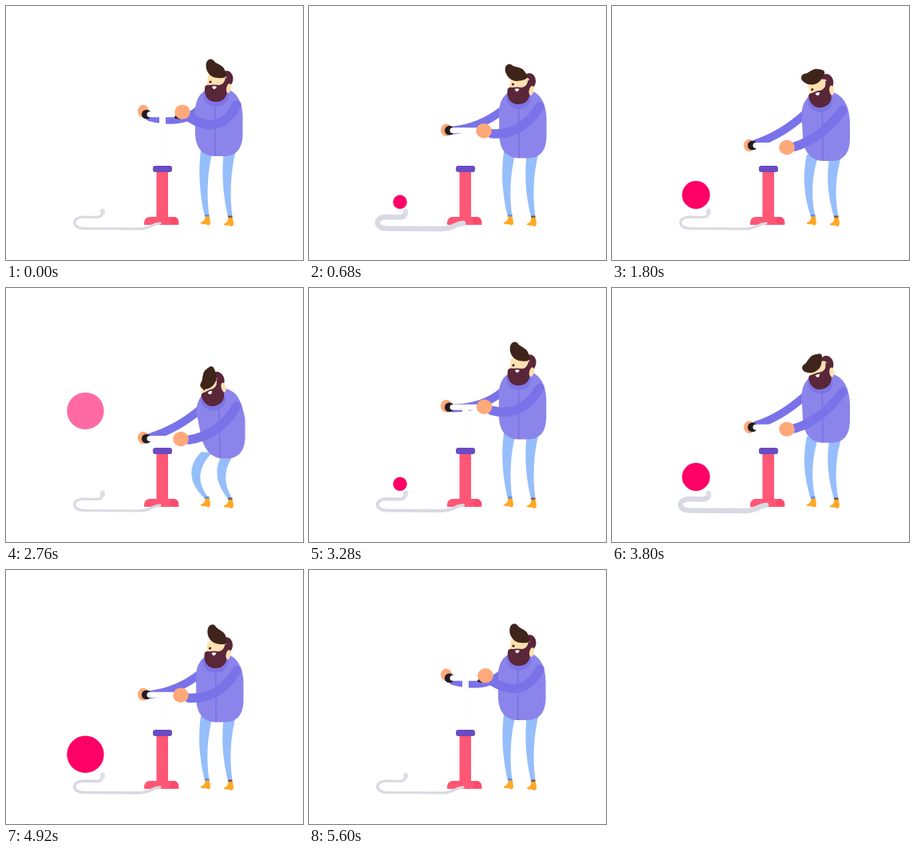
Write an HTML page with a canvas that moves like this. It is 372 by 318 pixels and loops after 5640 ms.

```html
<!DOCTYPE html>
<html lang="en">
<head>
<meta charset="utf-8">
<title>Pump</title>
<style>
html, body { margin: 0; width: 100%; height: 100%; overflow: hidden; background: #fff; }
canvas { display: block; width: 372px; height: 318px; }
</style>
</head>
<body>
<canvas id="stage"></canvas>
<script>
const W = 372, H = 318, LOOP = 5640, STROKES = 7;
const canvas = document.getElementById('stage');
const ratio = window.devicePixelRatio || 1;
canvas.width = W * ratio;
canvas.height = H * ratio;
const ctx = canvas.getContext('2d');

const SKIN = '#ffa97b', FACE = '#ffe0b0', BEARD = '#5a2639', HAIR = '#3f241b';
const COAT = '#8b85eb', SLEEVE = '#7a72e8', JEANS = '#96befb', SHOE = '#ffa826';
const RED = '#ff5775', PURPLE = '#6b4bc2', HOSE = '#d9d9e4', PINK = '#ff0066';

// Pose values at four depths of the stroke, from raised to pushed down.
const DEPTH = [0.05, 0.263, 0.519, 0.9];
const POSES = {
  bar: [136, 156.5, 175, 189],
  leftHand: [131.5, 155.5, 174.5, 187.5],
  handX: [221, 219, 219, 219],
  handY: [132.5, 156.5, 177, 189],
  farY: [139, 156, 172, 187],
  farCx: [222, 215, 212, 215],
  farCy: [150, 152, 162, 176],
  shoulder: [126, 128, 132, 150],
  nearY: [139, 160, 176, 190],
  nearCx: [268, 266, 262, 268],
  nearCy: [164, 163, 166, 184],
  left: [237, 238, 237.5, 238.5],
  right: [296.5, 297.5, 298, 299.5],
  top: [102, 104, 107, 126],
  bottom: [188, 190.5, 194, 213.5],
  lean: [0, 0.5, 2.5, 9],
  knee: [0, -0.5, -3, -19],
  headX: [263, 262.5, 261, 259.5],
  headY: [107, 110, 114, 134.5],
  tilt: [0, 0, -17, -24]
};
// The quiff trails the body a little.
const QUIFF_LAG = 25;
const QUIFF = {
  x: [273.5, 273.5, 262.5, 257.5],
  y: [88, 91, 83, 102.5],
  tilt: [0, 0, -74, -113]
};

const clamp = x => Math.max(0, Math.min(1, x));
const smooth = x => { x = clamp(x); return x * x * (3 - 2 * x); };
const easeOut = x => 1 - (1 - clamp(x)) ** 2;
const easeInOut = x => x < 0.5 ? 2 * x * x : 1 - 2 * (1 - x) ** 2;

// Smooth curve through the poses, mirrored at both ends of the stroke.
const [d0, d1, d2, d3] = DEPTH;
const KNOTS = [-d1, -d0, d0, d1, d2, d3, 2 - d3, 2 - d2];
const ORDER = [1, 0, 0, 1, 2, 3, 3, 2];

function sample(row, u) {
  let i = 1;
  while (i < 5 && u > KNOTS[i + 1]) i++;
  const v = k => row[ORDER[k]];
  const slope = k => (v(k + 1) - v(k - 1)) / (KNOTS[k + 1] - KNOTS[k - 1]);
  const h = KNOTS[i + 1] - KNOTS[i], s = (u - KNOTS[i]) / h;
  const a = smooth(s);
  return v(i) * (1 - a) + v(i + 1) * a
    + h * s * (1 - s) * ((1 - s) * slope(i) - s * slope(i + 1));
}

const strokesAt = t => (t + 20) / LOOP * STROKES;

function poseAt(rows, t) {
  const phase = (strokesAt(t) + 1) % 1;
  const u = phase < 0.5 ? phase * 2 : 2 - phase * 2;
  const pose = {};
  for (const key in rows) pose[key] = sample(rows[key], u);
  return pose;
}

function ellipse(x, y, rx, ry, color, turn = 0) {
  ctx.fillStyle = color;
  ctx.beginPath();
  ctx.ellipse(x, y, rx, ry, turn, 0, Math.PI * 2);
  ctx.fill();
}

function box(x, y, w, h, r, color) {
  ctx.fillStyle = color;
  ctx.beginPath();
  ctx.roundRect(x, y, w, h, r);
  ctx.fill();
}

function shape(d, color) {
  ctx.fillStyle = color;
  ctx.fill(new Path2D(d));
}

function line(d, color, width) {
  ctx.strokeStyle = color;
  ctx.lineWidth = width;
  ctx.stroke(new Path2D(d));
}

function placed(x, y, degrees, paint) {
  ctx.save();
  ctx.translate(x, y);
  ctx.rotate(degrees * Math.PI / 180);
  paint();
  ctx.restore();
}

function swellAt(s) {
  let most = 0;
  for (let n = 0; n < STROKES - 1; n++) {
    const p = s - n;
    most = Math.max(most, smooth((p - 0.47) / 0.2) * (1 - smooth((p - 0.88) / 0.32)));
  }
  return most;
}

function drawHose(s) {
  line('M193 272C180 273 183 279 165 279L97 278.5C82 278 82 264.5 97 264L114 264.5Q121 264 121 258',
    HOSE, 3.2 + 3.3 * swellAt(s));
  ellipse(121, 257.5, 3, 4, '#dedee7');
}

function drawBalloon(s, start) {
  const age = s - start;
  const flight = clamp((age - 3.152) * 1.83);
  let r = 0;
  [8.7, 8.8, 5.7].forEach((gain, i) => r += gain * easeOut((age - i - 0.46) / 0.26));
  if (r <= 0) return;
  ctx.globalAlpha = 1 - clamp((flight - 0.3) / 0.6);
  ellipse(122.7 - r, 254 - r - 130 * easeInOut(flight), r, r, PINK);
  ctx.globalAlpha = 1;
}

function drawPump() {
  box(173, 264, 43.5, 10, [7, 7, 1, 1], RED);
  ellipse(210.5, 269, 5, 4.7, '#f94a6b');
  box(188.5, 206, 14.5, 67, 0, RED);
  box(184, 200, 24, 8, 3, PURPLE);
}

function drawLegs(p) {
  const hip = p.bottom - 8, k = p.knee, mid = (hip + 262) / 2;
  for (const x of [0, 29]) {
    const drop = k * (x ? 0.7 : 1);
    shape(`M${244 + x} ${hip}Q${239 + x + drop * 1.1} ${mid} ${249 + x} 264L${254.5 + x} 264`
      + `Q${249 + x + drop} ${mid} ${259 + x} ${hip}Z`, JEANS);
    placed(x, x ? 1.5 : 0, 0, () => {
      shape('M249.5 263L254.5 263Q258 275 253 274.5L250 273Q244 274 243.5 271.5Q250 269 249.5 263Z', SHOE);
      box(249, 261, 5.5, 2.5, 0.5, x ? '#7d5a4a' : '#5f8fe6');
    });
  }
}

function drawCoat(p) {
  const { left: l, right: r, top: t, bottom: b, lean } = p;
  shape(`M${l} ${t + 30}C${l} ${t + 12} ${l + 9} ${t + 2} ${l + 24} ${t}L${r - 25} ${t}`
    + `C${r - 10} ${t + 3} ${r - lean / 2} ${t + 15} ${r} ${t + 38}L${r} ${b - 26}`
    + `Q${r - 1} ${b - 1} ${r - 22} ${b}L${l + 24 + lean} ${b}`
    + `Q${l + 2 + lean * 1.2} ${b - 1} ${l + lean * 0.7} ${b - 26}Z`, COAT);
  const x = (l + r) / 2 - 5;
  line(`M${x + lean / 4} ${t + 20}L${x + lean / 2} ${b - 1}`, '#776ee2', 1.4);
  ellipse(p.headX, p.headY + 5, 15.5, 14, '#7d75e6');
}

function drawHead(p, q) {
  placed(p.headX, p.headY, p.tilt, () => {
    ellipse(13.5, -16, 8, 10, BEARD);
    shape('M-11.5 -6L-10 -20Q2 -25 13 -19L15 -5Z', FACE);
    shape('M-14 -5Q-13 -9 -8 -8Q-2 -9 4 -8Q11 -9 12 -18L17 -12Q14 -6 14 0'
      + 'C13 10 6 13 0 13C-10 13 -15 6 -14 -5Z', BEARD);
    ellipse(16, -4, 2.9, 6, FACE, 0.2);
    shape('M-5 -6Q-2 -7.5 1 -6Q-0.5 -2.5 -2.5 -2.8Q-4 -3.3 -5 -6Z', '#fff');
    ellipse(-7, -12, 1.6, 1.5, HAIR);
  });
  placed(q.x, q.y, q.tilt, () => {
    shape('M2 -3C4 3 -4 3 -11 2C-18 1 -23 -6 -23 -13C-23 -20 -18 -23 -14 -20'
      + 'C-11 -16 -8 -16 -4 -13C0 -11 1 -6 2 -3Z', HAIR);
  });
}

function drawHandle(p) {
  const y = p.bar;
  line(`M180 ${p.farY}Q${p.farCx} ${p.farCy} 243 ${p.shoulder + 2}`, SLEEVE, 10);
  box(192, y, 8, Math.max(0, 200 - y), 0, '#fff');
  if (y < 190) line(`M198 ${y + 8}L198 199`, '#fbfbfd', 1);
  ellipse(172, p.leftHand, 7, 7.8, SKIN);
  box(170, y - 6.2, 12, 11.5, 5.5, '#211c22');
  box(211, y - 3, 10, 8, 3, '#211c22');
  box(176.5, y - 4, 36, 7, 3.5, '#fff');
}

function drawNearArm(p) {
  line(`M229 ${p.nearY}Q${p.nearCx} ${p.nearCy} 289 ${p.shoulder - 2}`, SLEEVE, 11.5);
  ellipse(p.handX, p.handY, 9.8, 9.2, SKIN);
}

function draw(t) {
  const s = strokesAt(t);
  const p = poseAt(POSES, t);
  const q = poseAt(QUIFF, t - QUIFF_LAG);
  ctx.setTransform(ratio, 0, 0, ratio, 0, 0);
  ctx.lineCap = 'round';
  ctx.fillStyle = '#fff';
  ctx.fillRect(0, 0, W, H);
  drawPump();
  drawHose(s);
  drawBalloon(s, 0);
  if (s < 6.7) drawBalloon(s, 3);
  drawLegs(p);
  drawHandle(p);
  drawCoat(p);
  drawHead(p, q);
  drawNearArm(p);
}

const begin = performance.now();
function frame(now) {
  draw(Math.max(0, now - begin) % LOOP);
  requestAnimationFrame(frame);
}
draw(0);
requestAnimationFrame(frame);
</script>
</body>
</html>
```
